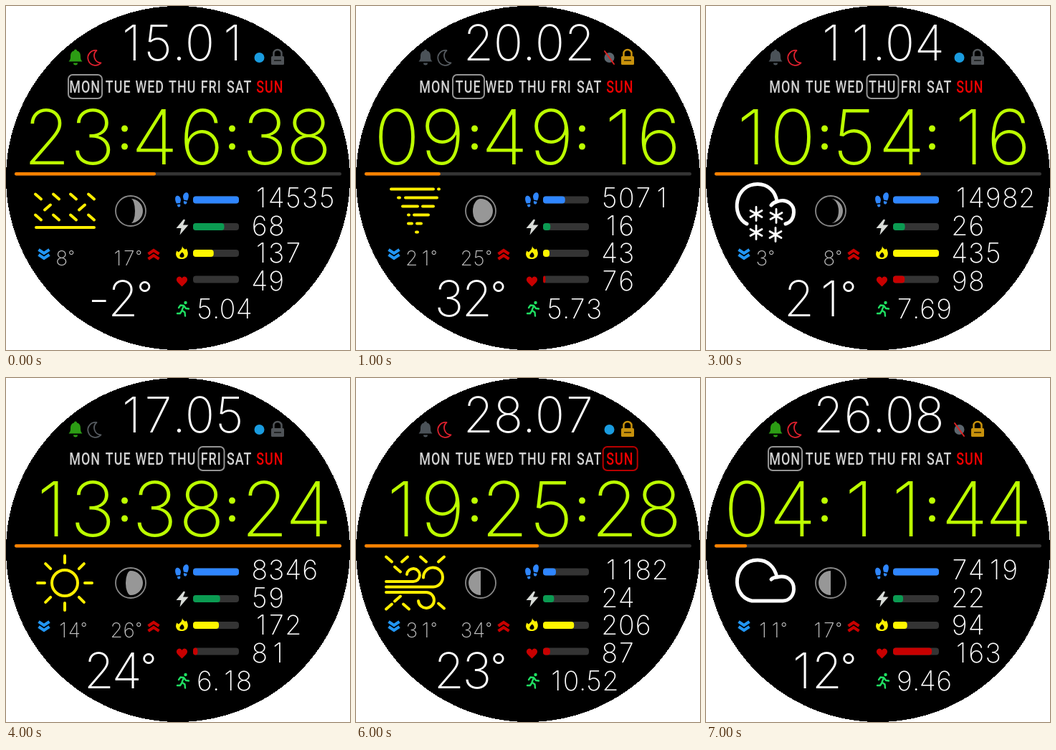
Write an HTML page that moves like this. It is 480 px wide and 480 px high and loops after 8 s.

```html
<!DOCTYPE html>
<html lang="en">
<head>
<meta charset="utf-8">
<title>Watch face</title>
<style>
  html, body { margin: 0; width: 100%; height: 100%; overflow: hidden; background: #fff; }
  svg { display: block; width: 480px; height: 480px; }
  text { text-anchor: middle; fill: #fff; }
  .num { font-family: Inter, Lato, sans-serif; font-weight: 230; font-optical-sizing: none; }
  .deg { font-size: .7em; font-weight: 300; }
  .big { font-size: 68.5px; }
  .mid { font-size: 37.5px; }
  .small { font-size: 28px; }
  .small text { fill: #c0c0c0; }
  #time { font-size: 106px; }
  #time text { fill: #bcff00; }
  #days text { font: 500 24.5px Roboto, "Liberation Sans", sans-serif; letter-spacing: 1.4px; fill: #d2d2d2; }
  #days .sun { fill: #f00000; }
  .line { fill: none; stroke-linecap: round; stroke-linejoin: round; }
  .track { fill: #343434; }
  .sky { stroke: #ffee00; stroke-width: 4; }
  .cloud { stroke: #fff; stroke-width: 5; }
  .flake { stroke: #fff; stroke-width: 2.8; }
  .wet { fill: #18a0dc; }
</style>
</head>
<body>
<svg viewBox="0 0 480 480">
  <circle cx="240" cy="240" r="240" shape-rendering="crispEdges"/>

  <g id="bell">
    <path d="M97 60.500c1.500 0 2 1 2 2 4 1 5 4 5 8 0 4 1 5 2.500 7h-19c1.500-2 2.500-3 2.500-7 0-4 1-7 5-8 0-1 .5-2 2-2z"/>
    <path d="M94 79.500h6a3 3 0 0 1-6 0z"/>
  </g>
  <path id="dnd" class="line" stroke-width="1.800" d="M126.500 62a10.500 10.500 0 1 0 6 17.500 10 10 0 0 1-6-17.500z"/>
  <circle id="link" cx="353.500" cy="72" r="7"/>
  <path id="cut" class="line" stroke="#d22" stroke-width="2" d="M347 63l13 18"/>
  <g id="lock">
    <path d="M371.500 70h15q1.500 0 1.500 1.500v9q0 1.500-1.500 1.500h-15q-1.500 0-1.500-1.500v-9q0-1.500 1.500-1.500z"/>
    <path fill="none" stroke-width="2.500" d="M373.500 71v-5a5.500 5 0 0 1 11 0v5"/>
    <path fill="none" style="stroke:#000" stroke-width="1.200" d="M374 76h10"/>
  </g>

  <g id="date" class="num big"></g>
  <g id="days"></g>
  <rect id="pick" y="96" height="33" rx="6" fill="none" stroke-width="2"/>

  <g id="time" class="num"></g>
  <g fill="#bcff00">
    <circle cx="165.500" cy="171" r="4.500"/><circle cx="165.500" cy="196" r="4.500"/>
    <circle cx="315.500" cy="171" r="4.500"/><circle cx="315.500" cy="196" r="4.500"/>
  </g>

  <rect class="track" x="12" y="232" width="456" height="4.500" rx="2.200"/>
  <rect id="bar" x="12" y="232" height="4.500" rx="2.200" fill="#ff8200"/>

  <g id="sky"></g>
  <circle cx="174" cy="286" r="21" fill="none" stroke="#888" stroke-width="1.800"/>
  <path id="moon" fill="#979797"/>

  <g fill="none" stroke-width="4">
    <path stroke="#2196f3" d="M45.500 340l7.500 5 7.500-5M45.500 347l7.500 5 7.500-5"/>
    <path stroke="#c80000" d="M198.500 346l7.500-5 7.500 5M198.500 353l7.500-5 7.500 5"/>
  </g>

  <g fill="#2f86ff">
    <path d="M238 265c3-1 6 2 6 6l-1 4-5 .5c-2-3-3-9 0-10.500zM239 277l4-.5c1 3-.5 4-2 4-1.500-.2-2-1.500-2-3.500z"/>
    <path d="M253 260.500c-3-1-6 2-6 6l1 4 5 1c2-3 3-9.500 0-11zM248 272l4.500 1c0 3-1.500 4-3 3.500-1.500-.5-2-2-1.500-4.500z"/>
  </g>
  <path fill="#d9dcd8" d="M248 297.500l-10.500 12.500h7l-2 9.500 12-14h-7.500l3-7z"/>
  <path fill="#fff000" d="M246 335c1 4 3 3 4 5l1.500-1.500c3 4 3 9 .5 12-3 3-9 3.500-12.500 1-3-3-3-7-1-10l2 2c3-2 5-4 5.500-8.500z"/>
  <path d="M246 343.500c3 3 4 7-.5 7.500-4 0-4.500-4 .5-7.500z"/>
  <path fill="#c80000" d="M245.500 391.500l-6-6c-3.500-4-.5-8 2.500-8 1.500 0 3 1 3.500 2.500.5-1.500 2-2.500 3.500-2.500 3 0 6 4 2.500 8z"/>
  <g class="line" stroke="#20df62" stroke-width="2.400">
    <circle cx="250.500" cy="414" r="1.500" fill="#20df62" stroke-width="1.500"/>
    <path d="M241 421l2.500-3.500 4.500.5 3 4 4 .5M248 418.500l-2.500 6 4 3 .5 5M245 426l-2 3h-4"/>
  </g>

  <g id="meters"></g>
  <g id="lo" class="num small"></g>
  <g id="hi" class="num small"></g>
  <g id="temp" class="num big"></g>
  <g id="steps" class="num mid"></g>
  <g id="power" class="num mid"></g>
  <g id="cal" class="num mid"></g>
  <g id="pulse" class="num mid"></g>
  <g id="km" class="num mid"></g>
</svg>
<script>
const $ = id => document.getElementById(id);
const set = (id, attrs) => { for (const k in attrs) $(id).setAttribute(k, attrs[k]); };

// label, centre, half width of the frame
const DAYS = [['MON', 110.5, 23.5], ['TUE', 157, 22], ['WED', 201, 24], ['THU', 246.5, 22],
              ['FRI', 286.5, 18], ['SAT', 326, 20], ['SUN', 368.7, 24]];

const METERS = [['stepsBar', 265.5, '#2f86ff'], ['powerBar', 303, '#0b9b52'],
                ['calBar', 340, '#fff700'], ['pulseBar', 376.5, '#c80000']];

const path = (cls, d) => `<path class="line ${cls}" d="${d}"/>`;
const dashes = list => path('sky', list.map(([x, y, s]) => `M${x - 4} ${y - 3.5 * s}l8 ${7 * s}`).join(''));
const drop = (x, y) => `<path class="wet" d="M${x} ${y - 9}c2 5 5.500 7 5.500 11a5.500 5.500 0 0 1-11 0c0-4 3.500-6 5.500-11z"/>`;
const dot = (x, y) => `<circle cx="${x}" cy="${y}" r="5.300" fill="#fff"/>`;
const flake = (x, y) => path('flake', `M${x} ${y - 9.5}v19M${x - 8} ${y - 4.5}l16 9M${x - 8} ${y + 4.5}l16-9`);
const openCloud = path('cloud',
  'M57 304C34 292 40 248.500 72 248.500C87 248.500 97 259 99 273C114 268 123 278 122.500 288C122 297 118 302 111 304M99 273q-5 1-8 5');

const SKY = {
  sand: dashes([45, 70, 94, 119].flatMap(x => [[x, 266, 1], [x, 295, 1]]).concat([[58, 281, -1], [106, 281, -1]]))
    + path('sky', 'M42 309H123'),
  tornado: path('sky', 'M49 255.500H108M115 255.500h1M59 267.500h2M69 267.500H113M65 279.500H86M93 279.500H108'
    + 'M73 291.500h1M81 291.500H101M73 303.500h5M85 303.500h6M84 315.500h2'),
  rain: openCloud + drop(71, 299) + drop(94, 301) + drop(71, 320) + drop(94, 322),
  snow: openCloud + flake(70, 290) + flake(98, 293) + flake(70, 316) + flake(97, 319),
  sun: `<circle class="line sky" cx="82" cy="286" r="18"/>` + path('sky',
    [...Array(8).keys()].map(i => {
      const c = Math.cos(i * Math.PI / 4), s = Math.sin(i * Math.PI / 4);
      return `M${82 + 28 * c} ${286 + 28 * s}L${82 + 38 * c} ${286 + 38 * s}`;
    }).join('')),
  sleet: openCloud + dot(71, 298) + drop(94, 302) + drop(71, 321) + dot(94, 322),
  wind: dashes([[46, 253, 1], [68, 253, -1], [94, 253, 1], [119, 253, -1], [58, 267, 1],
                [46, 319, -1], [70, 319, 1], [119, 318, 1], [58, 308, -1]])
    + path('sky', 'M42 284H80a9 9 0 1 0-9-10M42 291.500H108a13.500 13.500 0 1 0-14-13M42 299H98a11 11 0 1 1-11 12'),
  cloud: path('cloud',
    'M64 311C33 304 38 254 72 254C86 254 96 264 99 278C114 274 123 284 122.500 295C122 304 116 311 107 311ZM99 278q-5 0-8 3')
};

// moon: [lit side, terminator offset]; on: bell, do not disturb, link, lock
const STATES = [
  { date: '15.01', day: 0, time: '234638', bar: .432, sky: 'sand', moon: [1, 6], lo: '8°', hi: '17°', temp: '-2°',
    steps: '14535', goal: 1, power: '68', cal: '137', pulse: '49', km: '5.04', on: [1, 1, 1, 0] },
  { date: '20.02', day: 1, time: '094916', bar: .232, sky: 'tornado', moon: [1, -11], lo: '21°', hi: '25°', temp: '32°',
    steps: '5071', goal: .48, power: '16', cal: '43', pulse: '76', km: '5.73', on: [0, 0, 0, 1] },
  { date: '13.03', day: 2, time: '073652', bar: .83, sky: 'rain', moon: [1, 12], lo: '12°', hi: '19°', temp: '16°',
    steps: '12631', goal: 1, power: '83', cal: '258', pulse: '94', km: '8.27', on: [1, 0, 1, 1] },
  { date: '11.04', day: 3, time: '105416', bar: .631, sky: 'snow', moon: [1, 11], lo: '3°', hi: '8°', temp: '21°',
    steps: '14982', goal: 1, power: '26', cal: '435', pulse: '98', km: '7.69', on: [0, 1, 1, 0] },
  { date: '17.05', day: 4, time: '133824', bar: 1, sky: 'sun', moon: [1, -7], lo: '14°', hi: '26°', temp: '24°',
    steps: '8346', goal: 1, power: '59', cal: '172', pulse: '81', km: '6.18', on: [1, 0, 1, 0] },
  { date: '22.06', day: 5, time: '024448', bar: .732, sky: 'sleet', moon: [1, -17], lo: '-30°', hi: '-22°', temp: '-17°',
    steps: '10062', goal: 1, power: '47', cal: '415', pulse: '102', km: '6.53', on: [1, 1, 0, 1] },
  { date: '28.07', day: 6, time: '192528', bar: .533, sky: 'wind', moon: [-1, 0], lo: '31°', hi: '34°', temp: '23°',
    steps: '1182', goal: .28, power: '24', cal: '206', pulse: '87', km: '10.52', on: [0, 1, 1, 1] },
  { date: '26.08', day: 0, time: '041144', bar: .099, sky: 'cloud', moon: [-1, 0], lo: '11°', hi: '17°', temp: '12°',
    steps: '7419', goal: 1, power: '22', cal: '94', pulse: '163', km: '9.46', on: [1, 1, 0, 1] }
];

// One text with a centre for each character; a "1" stands right of its centre.
function place(id, str, centres, y, pitch) {
  const xs = centres.map((x, i) => str[i] === '1' ? x + .1 * pitch : x);
  const body = str.replace('°', '<tspan class="deg" dy="-.29em">°</tspan>');
  $(id).innerHTML = `<text y="${y}" x="${xs.join(' ')}">${body}</text>`;
}

// Fixed-pitch row of characters; align 0 = left, .5 = centre, 1 = right.
const CELL = { '.': .4, '-': .72, '°': .55 };
function row(id, str, x, y, pitch, align = 0) {
  const cells = [...str].map(c => (CELL[c] || 1) * pitch);
  let at = x - align * cells.reduce((a, b) => a + b);
  place(id, str, cells.map(w => (at += w) - w / 2), y, pitch);
}

function moonPath([side, k]) {
  const out = side > 0 ? 1 : 0, back = k > 0 ? 1 - out : out;
  return `M174 269A17 17 0 0 ${out} 174 303A${Math.abs(k)} 17 0 0 ${back} 174 269Z`;
}

function show(s) {
  row('date', s.date, 241.5, 75.5, 41.5, .5);
  row('lo', s.lo, 69, 362, 17.5);
  row('hi', s.hi, 190, 362, 17.5, 1);
  row('temp', s.temp, 160, 433, 39, .5);
  row('steps', s.steps, 342, 281, 23.5);
  row('power', s.power, 342, 319.5, 23.5);
  row('cal', s.cal, 342, 358, 23.5);
  row('pulse', s.pulse, 342, 397, 23.5);
  row('km', s.km, 265.5, 436, 23);
  place('time', s.time, [57, 121, 207.5, 273, 361, 422.5], 221, 63);

  const [, x, half] = DAYS[s.day];
  set('pick', { x: x - half, width: 2 * half, stroke: s.day === 6 ? '#b80000' : '#949494' });
  set('bar', { width: 456 * s.bar });
  $('sky').innerHTML = SKY[s.sky];
  set('moon', { d: moonPath(s.moon) });

  const fills = [s.goal, s.power / 100, s.cal / 305, (s.pulse - 70) / 110];
  METERS.forEach(([id], i) => set(id, { width: 64 * Math.min(1, Math.max(0, fills[i])) }));

  const [bell, dnd, link, lock] = s.on;
  set('bell', { fill: bell ? '#2c9c14' : '#4b5258' });
  set('dnd', { stroke: dnd ? '#e0202e' : '#565b60' });
  set('link', { fill: link ? '#1a9ce0' : '#5c666e' });
  set('cut', { visibility: link ? 'hidden' : 'visible' });
  const metal = lock ? '#c8920c' : '#505458';
  set('lock', { fill: metal, stroke: metal, 'stroke-width': 0 });
}

$('days').innerHTML = DAYS.map(([d, x]) =>
  `<text class="${d.toLowerCase()}" transform="translate(${x - .3} 121.3) scale(.73 1)">${d}</text>`).join('');
$('meters').innerHTML = METERS.map(([id, y, color]) =>
  `<rect class="track" x="261" y="${y}" width="64" height="10" rx="4"/>
   <rect id="${id}" x="261" y="${y}" height="10" rx="4" fill="${color}"/>`).join('');

let shown = -1, start;
function tick(now) {
  start ??= now;
  const i = Math.floor(Math.max(0, now - start) / 1000) % STATES.length;
  if (i !== shown) show(STATES[shown = i]);
  requestAnimationFrame(tick);
}
tick(performance.now());
</script>
</body>
</html>
```
